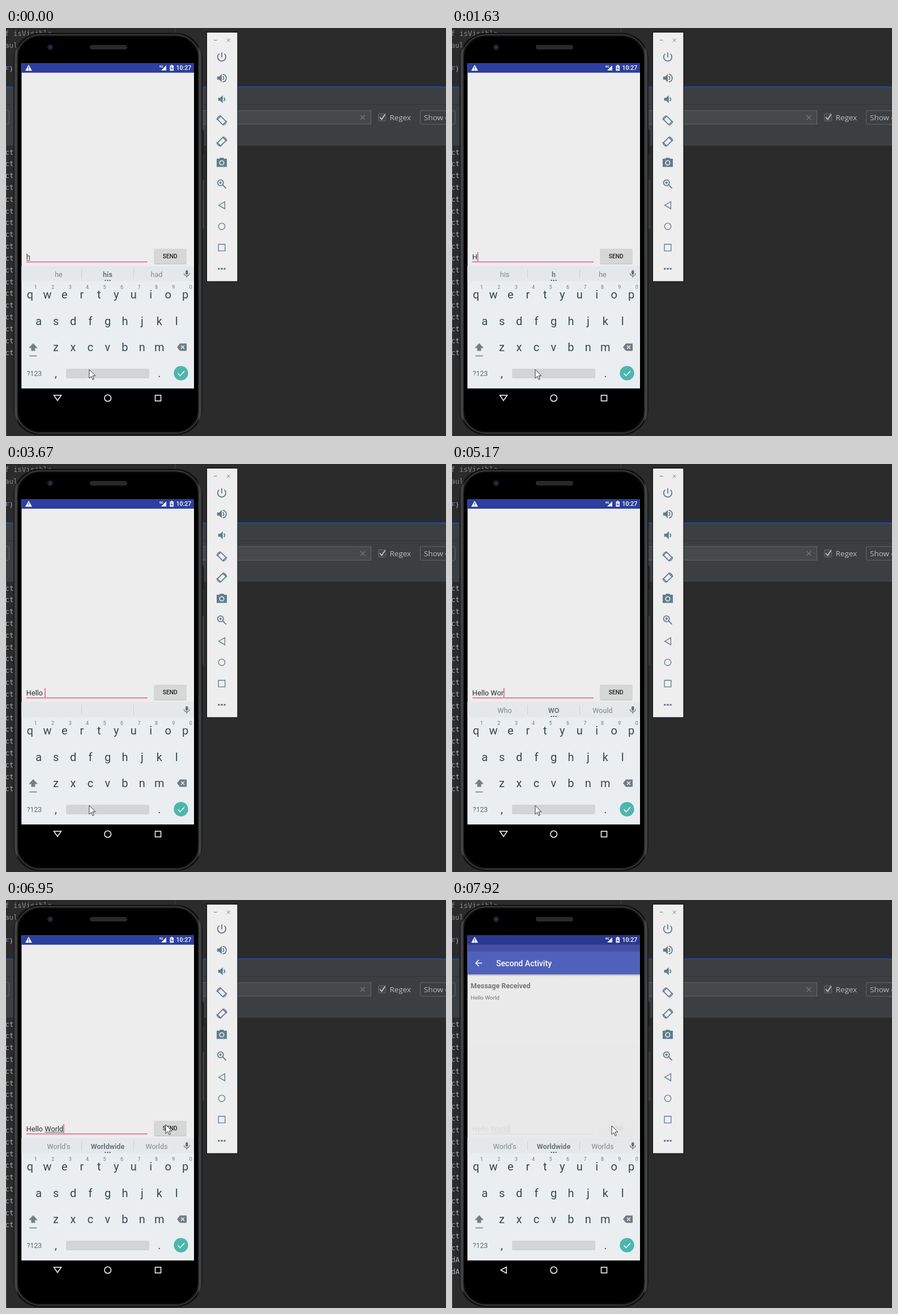
Recreate the animation shown at these times as an HTML page. Size 777 by 721 pixels, loop 8000 ms.

```html
<!DOCTYPE html>
<html lang="en">
<head>
<meta charset="utf-8">
<title>Message typing</title>
<style>
html, body { margin: 0; width: 100%; height: 100%; overflow: hidden; background: #2b2b2b; }
svg { display: block; width: 100vw; height: 100vh; }
text { font-family: Roboto, sans-serif; white-space: pre; }
.mono { font: 12.5px "DejaVu Sans Mono", monospace; fill: #a3adb5; }
.ide { font: 13.5px "Open Sans", sans-serif; fill: #bbb; }
.key { font-size: 20px; fill: #37474f; text-anchor: middle; }
.num { font-size: 9px; fill: #6f7c83; text-anchor: middle; }
.word { font-size: 12.6px; fill: #7d888d; text-anchor: middle; }
.bold { font-weight: 700; fill: #6b777d; }
.input { font-size: 12.75px; }
.line { fill: none; stroke: #607d8b; stroke-width: 2; }
.solid { fill: #607d8b; }
.nav { fill: none; stroke: #fff; stroke-width: 1.5; }
</style>
</head>
<body>
<svg viewBox="0 0 777 721" preserveAspectRatio="none">
  <defs>
    <clipPath id="page"><rect x="27.5" y="79" width="304.5" height="341.5"/></clipPath>
    <linearGradient id="edge">
      <stop offset="0" stop-color="#191a1b"/><stop offset=".012" stop-color="#4a4c4e"/>
      <stop offset=".025" stop-color="#111"/><stop offset=".975" stop-color="#111"/>
      <stop offset=".988" stop-color="#4a4c4e"/><stop offset="1" stop-color="#191a1b"/>
    </linearGradient>
    <linearGradient id="shade" x2="0" y2="1">
      <stop stop-color="#000" stop-opacity=".25"/><stop offset="1" stop-color="#000" stop-opacity="0"/>
    </linearGradient>
  </defs>

  <!-- editor behind -->
  <rect width="777" height="721" fill="#2b2b2b"/>
  <text class="mono" x="-2" y="14" style="fill:#858b90">f isVisible =</text>
  <text class="mono" x="-2" y="35" style="fill:#858b90">aul</text>
  <text class="mono" x="-2" y="77"><tspan fill="#9876aa" font-style="italic">F</tspan>)</text>
  <path d="M298.5 0V9" stroke="#444"/>
  <rect y="103" width="777" height="105" fill="#3c3f41"/>
  <rect y="103" width="777" height="3" fill="#25458c"/>
  <path d="M0 135.5H777" stroke="#313335"/>
  <path d="M.5 208V721" stroke="#4b4d4f"/>
  <g fill="#45494a" stroke="#646768">
    <rect x="300" y="146" width="344.500" height="24"/>
    <rect x="-20" y="146" width="25.500" height="24" rx="2" fill="#3c3f41"/>
    <rect x="731.500" y="146" width="90" height="24" rx="2" fill="#3c3f41"/>
    <rect x="657.500" y="151.500" width="13" height="13" rx="1"/>
  </g>
  <path d="m626 154 8 8m0-8-8 8" stroke="#747778" stroke-width="1.200"/>
  <path d="m660 157.500 3.500 4 6-9" fill="none" stroke="#c4c4c4" stroke-width="1.800"/>
  <text class="ide" x="677.500" y="163">Regex</text>
  <text class="ide" x="738" y="163">Show only</text>
  <g id="log"></g>

  <!-- handset -->
  <rect x="344" y="180" width="5.500" height="43" rx="2" fill="#202122"/>
  <rect x="344" y="268" width="6" height="87" rx="2" fill="#3c3e40"/>
  <rect x="13.500" y="9" width="333" height="710" rx="46" fill="url(#edge)" stroke="#161718"/>
  <rect x="17.500" y="12" width="325" height="704" rx="43" fill="none" stroke="#47494b" stroke-width="1.300"/>
  <rect x="21" y="15" width="318" height="698" rx="40" fill="#000"/>
  <circle cx="78" cy="34" r="4.500" fill="#17202f" stroke="#292c33"/>
  <circle cx="78" cy="34" r="1.800" fill="#30415e"/>
  <rect x="148" y="30" width="66" height="8" rx="4" fill="#292929"/>
  <rect x="27.500" y="62" width="304.500" height="575" fill="#ededed"/>
  <rect id="status" x="27.500" y="62" width="304.500" height="17" fill="#2d3f9f"/>
  <path d="m40 65 6 10.500H34z" fill="#fff"/>
  <path d="M40 68.500v3.500m0 1v1.300" stroke="#2d3f9f" stroke-width="1.300"/>
  <text x="270.500" y="70" font-size="5.500" font-weight="700" fill="#fff">4G</text>
  <path d="M283 66v9h-9z" fill="#fff"/>
  <path d="M289.500 66.500h2V65h2.500v1.500h2V75.500h-6.500z" fill="#fff"/>
  <path d="m293.500 67.500-2.500 4h3.500l-2.500 3" fill="none" stroke="#2d3f9f"/>
  <text x="300.500" y="74.300" font-size="10.500" font-weight="500" fill="#fff">10:27</text>

  <!-- message form -->
  <text id="msg" class="input" x="35.800" y="408.500"></text>
  <path id="under" stroke="#555" stroke-width=".9"/>
  <rect id="caret" y="396" width="1.400" height="16" fill="#f0417f"/>
  <rect x="36" y="412.500" width="214" height="1.700" fill="#f4618f"/>
  <rect x="261.500" y="391" width="57" height="26.500" rx="2" fill="#bcbebe"/>
  <rect x="261" y="390" width="58" height="26.500" rx="2" fill="#d6d7d7"/>
  <rect id="press" x="262" y="416.500" width="57" height="2.500" rx="1" fill="#b4b5b5"/>
  <text x="289.700" y="406.500" font-size="10.200" font-weight="500" text-anchor="middle" fill="#222">SEND</text>

  <!-- second page -->
  <g clip-path="url(#page)"><g id="second">
    <rect x="27.500" y="62" width="304.500" height="400" fill="#e9e9e9"/>
    <rect x="27.500" y="62" width="304.500" height="17.500" fill="#323f9c"/>
    <rect x="27.500" y="79" width="304.500" height="40.500" fill="#3f51b5"/>
    <rect x="27.500" y="119.500" width="304.500" height="3.500" fill="url(#shade)"/>
    <path d="M53 99.500H42m5.500-5.500-5.500 5.500 5.500 5.500" fill="none" stroke="#fff" stroke-width="1.500"/>
    <text x="78" y="104.500" font-size="14.100" font-weight="500" fill="#fff">Second Activity</text>
    <text x="33" y="144" font-size="12.500" font-weight="700" fill="#686868">Message Received</text>
    <text x="33" y="163.500" font-size="9.900" fill="#666">Hello World</text>
  </g></g>

  <!-- keyboard -->
  <rect x="27.500" y="420.500" width="304.500" height="216.500" fill="#eaeef1"/>
  <rect x="27.500" y="420.500" width="304.500" height="27" fill="#e5e8ea"/>
  <path d="M133.500 426v17m92-17v17" stroke="#cdd2d4"/>
  <text class="word" x="93" y="439.500"></text>
  <text class="word bold" x="179.500" y="439.500"></text>
  <text class="word" x="266" y="439.500"></text>
  <path id="dots" d="M174.500 446h2m2 0h2m2 0h2" stroke="#455a64" stroke-width="2"/>
  <rect x="317" y="428" width="4.500" height="8" rx="2.200" fill="#64737a"/>
  <path d="M314.500 433.500c0 6 9.500 6 9.500 0M319.200 438v3" fill="none" stroke="#64737a" stroke-width="1.300"/>
  <g id="keys"></g>
  <path d="m48 557 8 8.500h-4.500v5h-7v-5H40z" fill="#747f85"/>
  <path d="M41.500 579.500h13" stroke="#747f85" stroke-width="1.600"/>
  <path d="m302 564 5-6.500h12v13h-12z" fill="#6f7c83"/>
  <path d="m309 561 6 6m0-6-6 6" stroke="#eaeef1" stroke-width="1.500"/>
  <text x="50" y="614.500" font-size="12.300" text-anchor="middle" fill="#5d6a70">?123</text>
  <rect x="106" y="602" width="147" height="17" rx="3" fill="#d1d5d7"/>
  <circle cx="309" cy="610" r="12.700" fill="#4db6ac"/>
  <path d="m303.500 610.500 4 4 7.500-8" fill="none" stroke="#fff" stroke-width="1.600"/>
  <path id="back" class="nav"/>
  <circle class="nav" cx="179.700" cy="654" r="5.800"/>
  <rect class="nav" x="263.500" y="649" width="10" height="10"/>

  <!-- side tools -->
  <rect x="354.500" y="7.500" width="54.500" height="440.500" fill="#eee" stroke="#080808"/>
  <path d="M367 21.500h5.500m17.500-2.700 5.500 5.500m0-5.500-5.500 5.500" stroke="#777"/>
  <g id="tools"></g>

  <path id="mouse" d="M0 0v15.500l3.600-3.400 2.500 5.700 2.300-1-2.500-5.600h5z" fill="#fff" stroke="#222" stroke-width=".9"/>
</svg>
<script>
const $ = id => document.getElementById(id);
const label = (cls, x, y, s) => `<text class="${cls}" x="${x}" y="${y}">${s}</text>`;

const PITCH = 30.45;
const row = (letters, x, y, cls = "key") =>
  [...letters].map((c, i) => label(cls, x + i * PITCH, y, c)).join("");
$("keys").innerHTML = row("qwertyuiop", 42.5, 477.5) + row("1234567890", 52.3, 461, "num") +
  row("asdfghjkl", 57.7, 524.5) + row("zxcvbnm", 88, 571) + row(",", 88, 617) + row(".", 271, 617);

// icons on a 24 unit grid
const line = (d, extra = "") => `<path class="line" d="${d}" ${extra}/>`;
const solid = d => `<path class="solid" d="${d}"/>`;
const speaker = x => solid(`M${x} 9v6h4l5 5V4l-5 5z`);
const wave = x => line(`M${x} 8.500q4 3.500 0 7`);
const turn = '<rect class="line" x="7.500" y="4.500" width="9" height="15" rx="1" transform="rotate(-45 12 12)"/>' +
  line("M2 11Q3 4 10 2.500M22 13q-1 7-8 8.500", 'style="stroke-width:1.500"');
const tools = [
  line("M12 3v10M7 6a8 8 0 1 0 10 0"),
  speaker(3) + wave(14) + line("M14 4.300c9 2 9 13.400 0 15.400"),
  speaker(5) + wave(16),
  turn,
  `<g transform="matrix(-1 0 0 1 24 0)">${turn}</g>`,
  solid("M9 2 7 4H2v16h20V4h-5l-2-2z") + '<circle cx="12" cy="12" r="4.200" fill="#607d8b" stroke="#eee" stroke-width="1.800"/>',
  '<circle class="line" cx="9.500" cy="9.500" r="5.700"/>' + line("m14 14 6.500 6.500M7 9.500h5M9.500 7v5"),
  line("M18 5v14L6 12z", 'style="stroke-width:1.500"'),
  '<circle class="line" cx="12" cy="12" r="6.300" style="stroke-width:1.500"/>',
  line("M5.500 5.500h13v13h-13z", 'style="stroke-width:1.500"'),
  line("M4.500 12h3.500m2 0h4m2 0h3.500", 'style="stroke-width:3.500"')
];
$("tools").innerHTML = tools.map((d, i) =>
  `<g transform="translate(370.200 ${40.2 + i * 37.45}) scale(.9)">${d}</g>`).join("");

const logLines = n => Array.from({ length: n }, (_, i) =>
  label("mono", -1.5, 223.5 + i * 20.83, i < 20 ? "ct" : "dA")).join("");
const logs = [logLines(18), logLines(22)];

// time, text, start of underline (-1: none), caret, suggestions
const typing = [
  [0, "h", 0, 0, "he his had"],
  [120, "h", 0, 1, "he his had"],
  [550, "", -1, 0, "he his had"],
  [670, "", -1, 1, "he his had"],
  [950, "", -1, 1, "I The I'm"],
  [1200, "", -1, 0, "I The I'm"],
  [1630, "H", -1, 1, "his h he"],
  [1750, "H", 0, 1, "his h he"],
  [1870, "He", -1, 1, "his h he"],
  [1990, "He", 0, 1, "Her He Hey"],
  [2230, "Hel", -1, 1, "Her He Hey"],
  [2350, "Hel", 0, 1, "Help Hel Held"],
  [2470, "Hell", -1, 1, "Help Hel Held"],
  [2590, "Hell", 0, 1, "Help He'll Hello"],
  [3120, "Hello", -1, 1, "Help He'll Hello"],
  [3270, "Hello", 0, 1, "Hell Hello Hellos"],
  [3550, "Hello ", -1, 1, "Hell Hello Hellos"],
  [3670, "Hello ", -1, 1, ""],
  [4090, "Hello ", -1, 0, ""],
  [4340, "Hello W", -1, 1, ""],
  [4490, "Hello W", 6, 1, "Who W We"],
  [4610, "Hello Wo", -1, 1, "Who W We"],
  [4730, "Hello Wo", 6, 1, "Who WO Would"],
  [5170, "Hello Wor", -1, 1, "Who WO Would"],
  [5320, "Hello Wor", 6, 1, "Work Wor World"],
  [5470, "Hello Worl", -1, 1, "Work Wor World"],
  [5620, "Hello World", -1, 1, "Work World Worldwide"],
  [5740, "Hello World", 6, 1, "World's Worldwide Worlds"],
  [6320, "Hello World", 6, 0, "World's Worldwide Worlds"],
  [6710, "Hello World", 6, 1, "World's Worldwide Worlds"],
  [7250, "Hello World", 6, 0, "World's Worldwide Worlds"],
  [7800, "Hello World", 6, 1, "World's Worldwide Worlds"]
];
const path = [
  [0, 147, 603.5], [6020, 163, 573], [6170, 222, 513], [6320, 246, 415], [6440, 251, 355],
  [6590, 262, 367], [6710, 272, 381], [6830, 280, 392], [6950, 282, 397], [7100, 282, 399]
];
const slide = [[0, 0, 40], [7800, .3, 30], [7920, .9, 12]]; // opacity, offset
const at = (list, t) => list.findLast(s => s[0] <= t);

const pen = document.createElement("canvas").getContext("2d");
const width = s => {
  pen.font = "12.75px Roboto, sans-serif";
  return pen.measureText(s).width;
};
const words = document.querySelectorAll(".word");
const LEFT = 35.8;

function draw(t) {
  const [, text, from, caret, hints] = at(typing, t);
  const end = LEFT + width(text);
  $("msg").textContent = text || "Enter Your Message Here";
  $("msg").setAttribute("fill", text ? "#2b2b2b" : "#999");
  $("under").setAttribute("d", from < 0 ? "" : `M${LEFT + width(text.slice(0, from))} 410.500H${end}`);
  $("caret").setAttribute("x", end);
  $("caret").setAttribute("opacity", caret);
  const list = hints.split(" ");
  words.forEach((w, i) => w.textContent = list[i] || "");
  $("dots").setAttribute("opacity", hints ? 1 : 0);

  const [, x, y] = at(path, t);
  $("mouse").setAttribute("transform", `translate(${x} ${y})`);

  const [, alpha, dy] = at(slide, t);
  $("second").setAttribute("opacity", alpha);
  $("second").setAttribute("transform", `translate(0 ${dy})`);
  $("status").setAttribute("fill", t < 7920 ? "#2d3f9f" : "#2a3890");
  $("press").setAttribute("opacity", t < 7650 ? 0 : 1);
  $("back").setAttribute("d", t < 7920 ? "M84.500 649h13l-6.500 9.500z" : "M96 648.500v11l-10-5.500z");
  const log = logs[+(t >= 7800)];
  if (draw.log !== log) $("log").innerHTML = draw.log = log;
}

const start = performance.now();
function tick() {
  draw((performance.now() - start) % 8000);
  requestAnimationFrame(tick);
}
tick();
</script>
</body>
</html>
```
